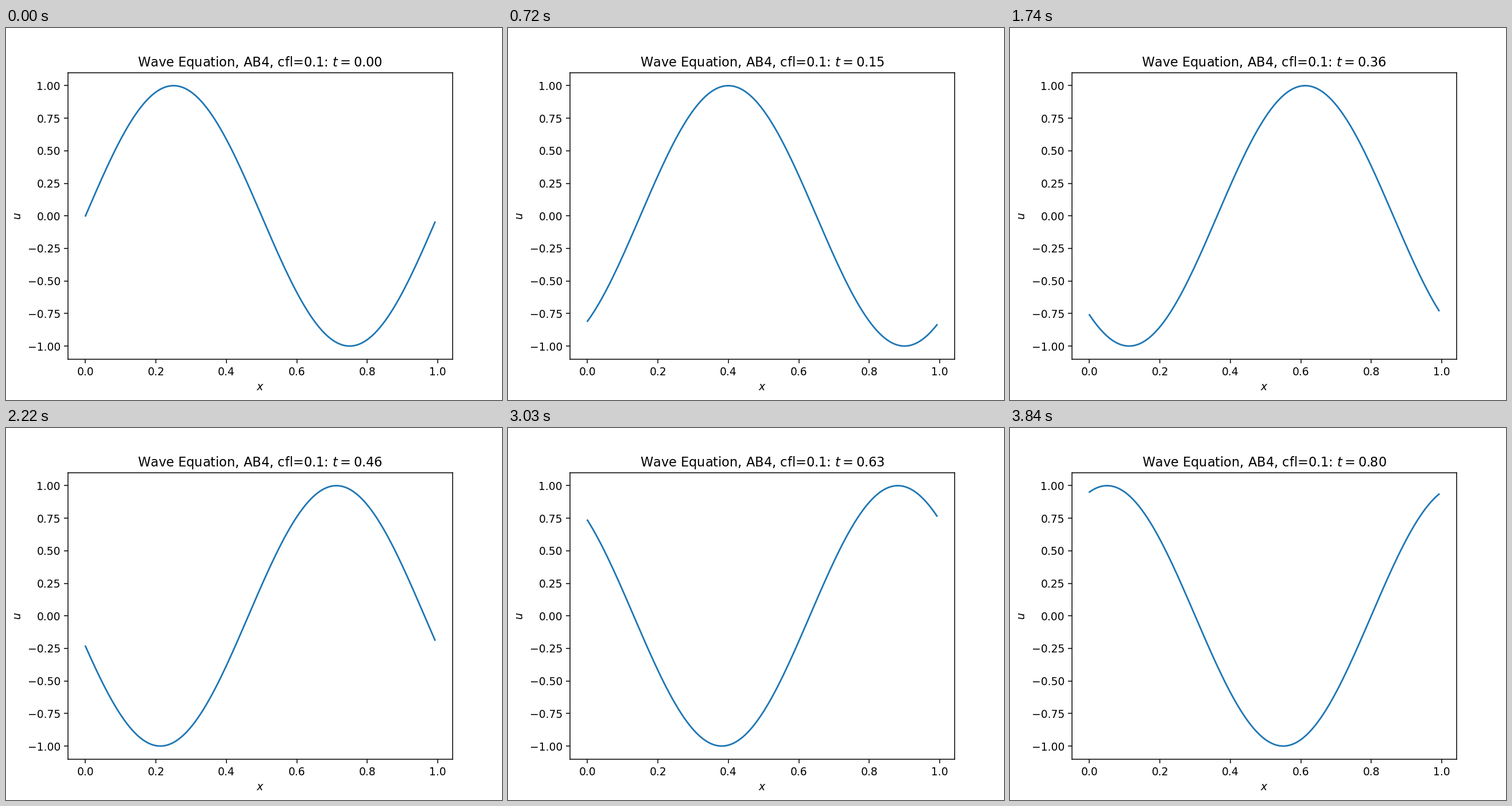
A matplotlib script for the animation above (3.87 s loop, 864x648 px).

```python
import numpy as np
import matplotlib.pyplot as plt
from matplotlib.animation import FuncAnimation

CELLS = 128
CFL = 0.1
STEPS_PER_FRAME = 8
FRAMES = 129
INTERVAL = 30

dt = CFL / CELLS
x = np.arange(CELLS) / CELLS


def wave(t):
    """Sine profile advected to the right at unit speed on a periodic domain."""
    return np.sin(2 * np.pi * (x - t))


fig, ax = plt.subplots(figsize=(6.4, 4.8), dpi=135)
line, = ax.plot(x, wave(0))
ax.set_xlim(ax.get_xlim())
ax.set_ylim(ax.get_ylim())
ax.set_xlabel("$x$")
ax.set_ylabel("$u$")
title = ax.set_title("")


def update(frame):
    t = frame * STEPS_PER_FRAME * dt
    line.set_ydata(wave(t))
    title.set_text(f"Wave Equation, AB4, cfl={CFL}: $t={t:.2f}$")
    return line, title


anim = FuncAnimation(fig, update, frames=FRAMES, interval=INTERVAL,
                     repeat=True, repeat_delay=0)
plt.show()
```
